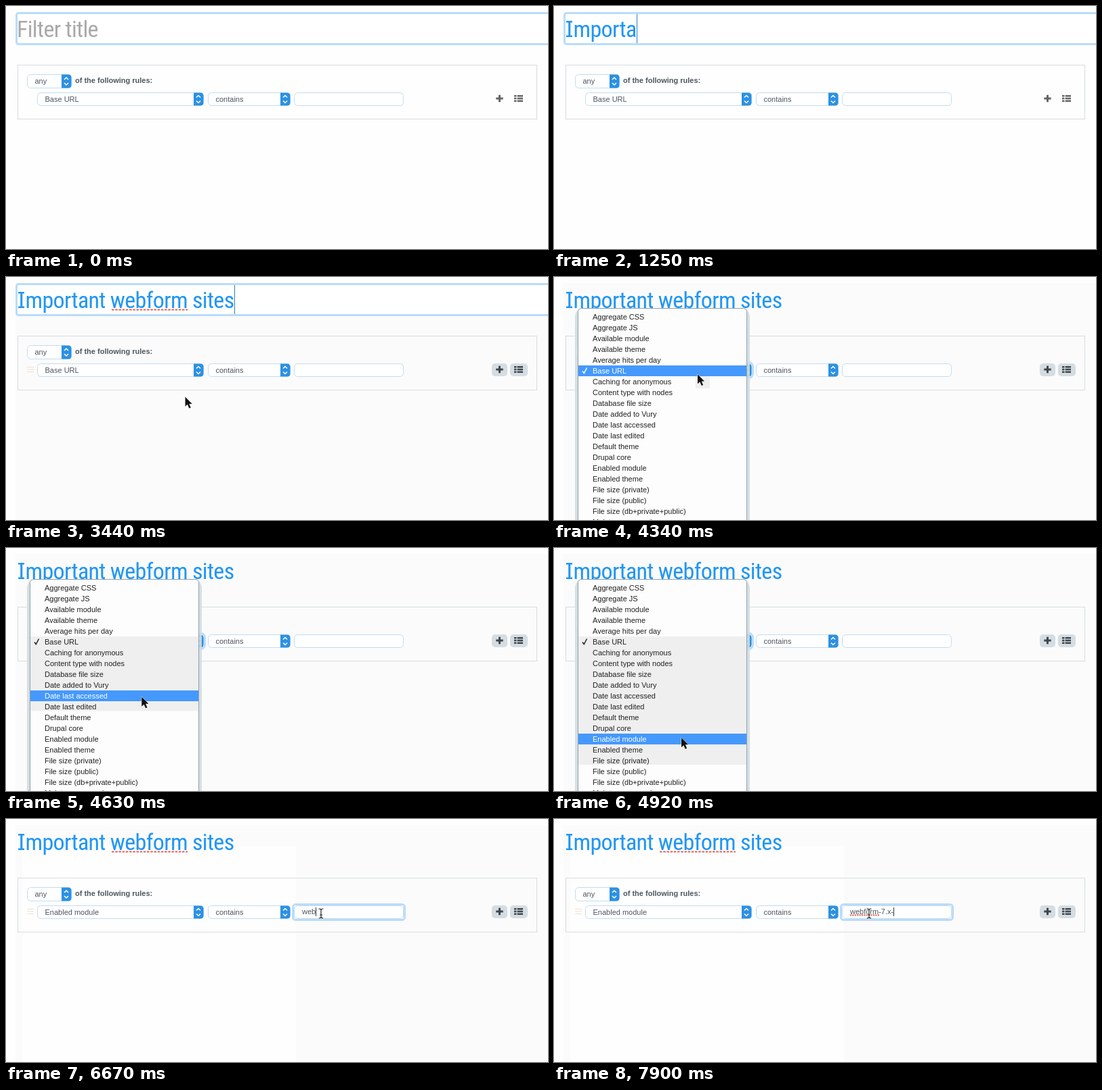
An HTML page for the animation above (8 s loop, 800x360 px).

```html
<!DOCTYPE html>
<html lang="en">
<head>
<meta charset="utf-8">
<title>Filter builder</title>
<style>
html, body { margin: 0; width: 100%; height: 100%; overflow: hidden; background: #fefefe; }
svg { display: block; width: 800px; height: 360px; }
text { font: 11px "Liberation Sans", Arial, sans-serif; fill: #4d5660; white-space: pre; }
.title { font-size: 34px; font-stretch: 75%; fill: #2196f3; }
.hint { fill: #a9a9a9; }
.bold { font-weight: bold; }
.field { fill: #fff; stroke: #c3dcee; }
.ring { fill: none; stroke: #b9dcfb; stroke-width: 3; }
.typo { fill: none; stroke: #d9655b; stroke-width: 2; }
#menu text { fill: #222; }
#menu text.on { fill: #fff; }
</style>
</head>
<body>
<svg id="stage" viewBox="0 0 800 360">
  <rect id="shade" x="14" y="9" width="786" height="351" fill="#fbfbfb"/>
  <rect id="clear" x="24" y="40" height="320" fill="#fefefe"/>

  <g id="titleFocus">
    <rect class="ring" x="15.5" y="10.5" width="800" height="46" rx="3" style="fill:#fff"/>
  </g>
  <text id="hint" class="title hint" x="16" y="46">Filter title</text>
  <g id="capital">
    <text class="title" x="22.5" y="46" text-anchor="middle">I</text>
    <path d="M18 23.2H27M18 44.7H27" stroke="#2196f3" stroke-width="2.6"/>
  </g>
  <text id="title" class="title" x="28.5" y="46"></text>
  <path id="titleTypo" class="typo" d="M156 48.5H268" stroke-dasharray="3.6 1.6"/>
  <rect id="titleCaret" y="12" width="1" height="43" fill="#2a7fc4"/>

  <rect x="17.5" y="87.5" width="766" height="80" fill="none" stroke="#d7dcdf"/>
  <text class="bold" x="102" y="114">of the following rules:</text>
  <path id="handle" d="M31 133.5H41M31 137H41M31 140.5H41" stroke="#f1dfcb"/>
  <g id="selects"></g>
  <rect id="selectRing" class="ring" x="44.5" y="126.5" width="249" height="23" rx="6"/>
  <rect class="field" x="425.5" y="128.5" width="161" height="19" rx="5"/>
  <rect id="inputRing" class="ring" x="423.5" y="126.5" width="165" height="23" rx="4"/>
  <text id="input" x="437" y="141"></text>
  <path id="inputTypo" class="typo" d="M437 142.5H480" stroke-dasharray="2.2 1.2"/>
  <rect id="inputCaret" y="131" width="1" height="13" fill="#333"/>

  <g id="pills" fill="#d4dde3">
    <rect x="717" y="128" width="23" height="19" rx="5"/>
    <rect x="744" y="128" width="26" height="19" rx="5"/>
  </g>
  <g id="icons">
    <path d="M723.3 137H733.7M728.5 131.8V142.2" stroke-width="3"/>
    <path d="M750 133.3H753.4M754.6 133.3H763M750 137H753.4M754.6 137H763M750 140.7H753.4M754.6 140.7H763" stroke-width="2.6"/>
  </g>

  <g id="menu">
    <path d="M31 370V58Q32 50 38 47H282Q288 50 289 58V370Z" fill="#d2dce1" opacity=".88"/>
    <rect x="35.5" y="46.5" width="249" height="340" rx="5" fill="#fdfdfd" stroke="#8fa2ae"/>
    <rect id="trail" fill="#efefef"/>
    <rect id="hover" x="36" width="248" height="16" fill="#4599fd"/>
    <path id="check" d="M42 139.5L44.3 142.5L48.5 134.5" fill="none" stroke-width="1.5"/>
    <g id="items"></g>
  </g>

  <path id="arrow" d="M0 0V14.2L3.3 11.2L5.8 16.8L8.2 15.8L5.8 10.3H10.2Z" fill="#111" stroke="#fff" stroke-width="1" paint-order="stroke"/>
  <g id="beam" fill="none" stroke-linecap="round">
    <path id="beamShape" d="M-3 -7Q0 -7 0 -5Q0 -7 3 -7M0 -5V5M-3 7Q0 7 0 5Q0 7 3 7M-1.5 2H1.5" stroke="#fff" stroke-width="2.6"/>
    <path d="M-3 -7Q0 -7 0 -5Q0 -7 3 -7M0 -5V5M-3 7Q0 7 0 5Q0 7 3 7M-1.5 2H1.5" stroke="#222" stroke-width="1.2"/>
  </g>
</svg>
<script>
const LOOP = 8000;
const TITLE = "mportant webform sites";
const TITLE_WIDTH = 308;
const INPUT = "webform-7.x-";
const ITEMS = ["Aggregate CSS", "Aggregate JS", "Available module", "Available theme",
  "Average hits per day", "Base URL", "Caching for anonymous", "Content type with nodes",
  "Database file size", "Date added to Vury", "Date last accessed", "Date last edited",
  "Default theme", "Drupal core", "Enabled module", "Enabled theme", "File size (private)",
  "File size (public)", "File size (db+private+public)", "Maintenance mode"];

const TITLE_KEYS = [350, 530, 710, 770, 950, 1130, 1230, 1330, 1430, 1610, 1730, 1910,
  1970, 2090, 2150, 2270, 2380, 2440, 2490, 2610, 2670, 2730, 2730];
const INPUT_KEYS = [6310, 6490, 6670, 6730, 6850, 6910, 7020, 7190, 7430, 7670, 7730, 7900];
const POINTER = [[3090, 470, 330], [3500, 230, 152], [3740, 214, 146], [4339, 214, 146],
  [4340, 212, 144], [4400, 211, 152], [4680, 198, 235], [4830, 190, 300], [4920, 188, 281],
  [5200, 188, 281], [5490, 396, 205], [5790, 465, 140]];
const FADE = [[5270, 1], [5490, .22], [5550, 0]];
const AT = { hover: 3330, open: 3560, menu: 3620, move: 4400, pick: 5150, done: 5550, beam: 5760, focus: 5890 };

const $ = id => document.getElementById(id);
const show = (id, on) => { $(id).style.display = on ? "" : "none"; };
const set = (node, attrs) => { for (const k in attrs) node.setAttribute(k, attrs[k]); return node; };
const add = (parent, tag, attrs, text = "") => {
  const node = set(document.createElementNS("http://www.w3.org/2000/svg", tag), attrs);
  node.textContent = text;
  return parent.appendChild(node);
};
const typed = (keys, t) => keys.filter(k => k <= t).length;

function track(points, t) {
  const i = points.findIndex(p => p[0] > t);
  if (i === 0) return points[0].slice(1);
  if (i < 0) return points[points.length - 1].slice(1);
  const a = points[i - 1], b = points[i], u = (t - a[0]) / (b[0] - a[0]);
  return a.slice(1).map((v, k) => v + (b[k + 1] - v) * u);
}

function select(x, y, w, h, label) {
  const box = $("selects"), right = x + w, cx = right - 8, cy = y + h / 2;
  add(box, "rect", { class: "field", x: x + .5, y: y + .5, width: w - 1, height: h - 1, rx: 5 });
  add(box, "path", { fill: "#2c91e2",
    d: `M${right - 15} ${y + .5}h10q4.5 0 4.5 4.5v${h - 10}q0 4.5 -4.5 4.5h-10z` });
  add(box, "path", { fill: "none", stroke: "#fff", "stroke-width": 1.5,
    d: `M${cx - 3} ${cy - 2.5}l3 -3l3 3M${cx - 3} ${cy + 2.5}l3 3l3 -3` });
  return add(box, "text", { x: x + 11.5, y: cy + 3.5 }, label);
}

select(31, 101, 66, 21, "any");
const ruleLabel = select(46, 128, 246, 20, "Base URL");
select(298, 128, 122, 20, "contains");
const rows = ITEMS.map((name, i) => add($("items"), "text", { x: 57, y: 63 + 16 * i }, name));

// Use the installed face nearest to the narrow title, then adjust its tracking.
function titleStops() {
  const node = $("title");
  node.textContent = TITLE;
  const faces = ["Roboto Condensed", "Roboto", "Noto Sans", "Open Sans"].map(name => {
    const family = `"${name}", sans-serif`;
    node.style.fontFamily = family;
    return { family, width: node.getComputedTextLength() };
  });
  const off = f => Math.abs(f.width - TITLE_WIDTH);
  const best = faces.reduce((a, b) => off(b) < off(a) ? b : a);
  for (const n of document.querySelectorAll(".title")) {
    n.style.fontFamily = best.family;
    n.style.letterSpacing = (TITLE_WIDTH - best.width) / TITLE.length + "px";
  }
  return [...TITLE].map((_, i) => node.getSubStringLength(0, i + 1));
}
const stops = titleStops();

function drawTitle(t) {
  const n = typed(TITLE_KEYS, t);
  show("hint", n === 0);
  show("capital", n > 0);
  $("title").textContent = TITLE.slice(0, Math.max(0, n - 1));
  show("titleTypo", n >= 18);
  show("titleFocus", t < AT.open);
  show("titleCaret", t >= 60 && t < AT.open);
  set($("titleCaret"), { x: n === 0 ? 17 : n === 1 ? 28 : Math.round(28.5 + stops[n - 2]) });
}

function drawRule(t) {
  const active = t >= AT.hover, n = typed(INPUT_KEYS, t), input = $("input");
  show("shade", active);
  show("pills", active);
  show("handle", active);
  set($("icons"), { stroke: active ? "#42464b" : "#666" });
  show("clear", t >= 5490);
  set($("clear"), { width: t < AT.done ? 383 : 404 });
  show("selectRing", t >= AT.open && t < AT.focus);
  ruleLabel.textContent = t < AT.done ? "Base URL" : "Enabled module";
  show("inputRing", t >= AT.focus);
  show("inputCaret", t >= AT.focus);
  input.textContent = INPUT.slice(0, n);
  set($("inputCaret"), { x: Math.round(437 + (n ? input.getComputedTextLength() : 0)) });
  show("inputTypo", n >= 8);
}

function drawMenu(t, y) {
  show("menu", t >= AT.menu && t < AT.done);
  $("menu").style.opacity = track(FADE, t)[0];
  const row = t >= AT.pick ? 14 : Math.floor((y - 51) / 16);
  const lit = t < AT.pick || t >= AT.pick + 60;
  show("hover", lit);
  set($("hover"), { y: 51 + 16 * row });
  rows.forEach((r, i) => r.classList.toggle("on", lit && i === row));
  set($("check"), { stroke: lit && row === 5 ? "#fff" : "#222" });
  show("trail", t >= 4340 && t < 5330);
  const reach = t < 4830 ? y + 21 : 321;
  set($("trail"), t < AT.move
    ? { x: 209, y: 147, width: 21, height: 18 }
    : { x: 36, y: 131, width: 248, height: reach - 131 });
}

function draw(t) {
  const [x, y] = track(POINTER, t);
  drawTitle(t);
  drawRule(t);
  drawMenu(t, y);
  show("arrow", t >= POINTER[0][0] && t < AT.beam);
  show("beam", t >= AT.beam);
  for (const id of ["arrow", "beam"]) set($(id), { transform: `translate(${x} ${y})` });
}

const start = performance.now();
function tick() {
  draw((performance.now() - start) % LOOP);
  requestAnimationFrame(tick);
}
tick();
</script>
</body>
</html>
```
